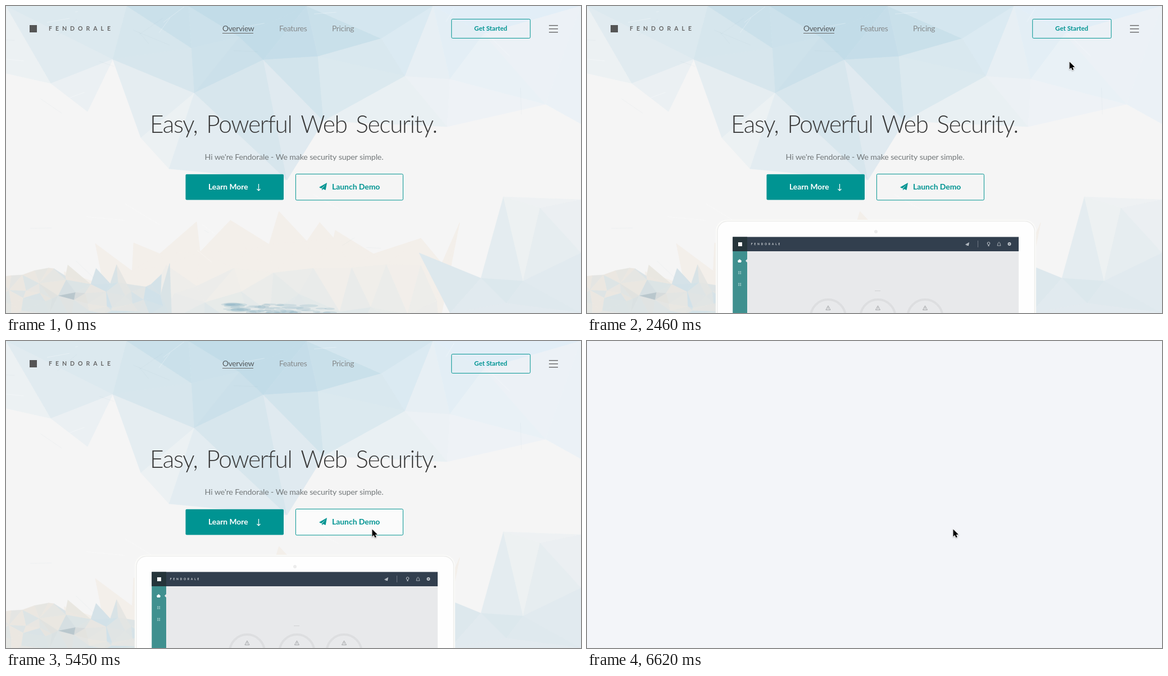
An HTML page with a canvas for the animation above (8 s loop, 1023 px wide and 547 px high).

```html
<!DOCTYPE html>
<html lang="en">
<head>
<meta charset="utf-8">
<title>Web Security</title>
<style>
html, body { margin: 0; width: 100%; height: 100%; overflow: hidden; background: #f5f5f5; }
canvas { display: block; width: 1023px; height: 547px; }
</style>
</head>
<body>
<canvas id="stage" width="1023" height="547"></canvas>
<script>
const W = 1023, H = 547, LOOP = 8000;
const TEAL = '#009492';
const PAPER = [245, 245, 245], BLUE = [190, 218, 231], HAZE = [205, 230, 250];
const CREAM = [243, 239, 234], MIST = [222, 231, 233], ICE = [208, 225, 233];
const ctx = document.getElementById('stage').getContext('2d');

const clamp = u => Math.max(0, Math.min(1, u));
const mix = (a, b, u) => a + (b - a) * u;
const blend = (a, b, u) => a.map((v, i) => mix(v, b[i], clamp(u)));
const bell = (x, mid, width) => Math.exp(-(((x - mid) / width) ** 2));
const rgb = c => `rgb(${c.map(Math.round)})`;

function rng(seed) {
  return () => (seed = (seed * 16807) % 2147483647) / 2147483647;
}

// ---- low-poly scenery ----

function pairs(list) {
  return list.flatMap((v, i) => i % 2 ? [] : [[v, list[i + 1]]]);
}

function jitterGrid(x0, y0, x1, y1, cell, rand) {
  const pts = [];
  for (let y = y0; y <= y1; y += cell * 0.8)
    for (let x = x0; x <= x1; x += cell)
      pts.push([x + (rand() - 0.5) * cell, y + (rand() - 0.5) * cell * 0.7]);
  return pts;
}

function circle([ax, ay], [bx, by], [cx, cy]) {
  const ux = bx - ax, uy = by - ay, vx = cx - ax, vy = cy - ay;
  const d = 2 * (ux * vy - uy * vx);
  if (Math.abs(d) < 1e-6) return null;
  const u = ux * ux + uy * uy, v = vx * vx + vy * vy;
  const x = (vy * u - uy * v) / d, y = (ux * v - vx * u) / d;
  return [ax + x, ay + y, x * x + y * y];
}

// Delaunay triangles: those whose circumcircle holds no other point.
function triangles(pts) {
  const out = [], n = pts.length;
  for (let i = 0; i < n; i++)
    for (let j = i + 1; j < n; j++)
      for (let k = j + 1; k < n; k++) {
        const c = circle(pts[i], pts[j], pts[k]);
        if (c && !pts.some(([x, y]) => (x - c[0]) ** 2 + (y - c[1]) ** 2 < c[2] - 1e-3))
          out.push([pts[i], pts[j], pts[k]]);
      }
  return out;
}

function facets(g, pts, rand, shade) {
  for (const [a, b, c] of triangles(pts)) {
    const color = shade((a[0] + b[0] + c[0]) / 3, (a[1] + b[1] + c[1]) / 3, rand() - 0.5);
    if (!color) continue;
    trace(g, [...a, ...b, ...c]);
    g.fillStyle = g.strokeStyle = rgb(color);
    g.lineWidth = 0.6;
    g.fill();
    g.stroke();
  }
}

function skyShade(x, y, r) {
  const edge = 130 + 150 * bell(x, 430, 190) + 60 * x / W;
  if (y > edge) return null;
  const strength = (0.45 + 0.55 * bell(x, 450, 260)) * (1 - 0.8 * y / edge);
  return blend(PAPER, blend(BLUE, HAZE, (x - 600) / 250), strength + r * 0.16);
}

function landShade(x, y, r) {
  const ridge = 400 + 55 * ((x - 500) / 300) ** 2;
  return y < ridge ? null : blend(CREAM, MIST, (y - ridge - 60) / 110 + r * 0.3);
}

function shoreShade(x, y, r) {
  if (y < 340 + Math.max(0, 885 - x) * 1.4) return null;
  return blend(PAPER, ICE, 0.2 + (y - 340) / 450 + r * 0.25);
}

function rockShade(x, y, r) {
  if (y < 476 + 25 * clamp((x - 200) / 90)) return null;
  const base = blend([235, 231, 225], ICE, x / 330 + r * 0.9);
  return blend(base, [150, 172, 184], 0.6 * bell(x, 105, 22) * bell(y, 518, 9));
}

function paintScenery() {
  const layer = document.createElement('canvas');
  layer.width = W;
  layer.height = H;
  const g = layer.getContext('2d'), rand = rng(4127);
  g.fillStyle = rgb(PAPER);
  g.fillRect(0, 0, W, H);

  const sky = pairs([0, 0, 0, 120, 80, 138, 145, 188, 190, 95, 215, 0, 240, 235, 290, 290,
    330, 75, 335, 155, 325, 0, 415, 55, 458, 96, 535, 0, 500, 310, 555, 90, 668, 58, 565, 205,
    710, 125, 785, 215, 790, 130, 760, 0, 850, 50, 960, 175, W, 0, W, 210]);
  const shore = pairs([735, 440, 845, 485, 885, 340, 950, 360, W, 345, W, 440,
    920, 490, 890, 530, 790, H, W, H]);
  facets(g, sky, rand, skyShade);
  facets(g, jitterGrid(40, 380, 800, 590, 62, rand), rand, landShade);
  facets(g, shore, rand, shoreShade);
  facets(g, jitterGrid(-15, 465, 300, 570, 27, rand), rand, rockShade);

  // faint creases between facets
  g.lineWidth = 1;
  for (let i = 0; i < 30; i++) {
    const x = rand() * W, y = i % 3 ? rand() * 170 : 350 + rand() * 110;
    g.strokeStyle = i % 2 ? 'rgba(255,255,255,.3)' : 'rgba(120,150,160,.06)';
    trace(g, [x, y, x + rand() * 140 - 70, y + rand() * 90 - 30], false);
    g.stroke();
  }
  // pool of water along the bottom
  g.fillStyle = 'rgba(130,175,192,.22)';
  for (let i = 0; i < 50; i++) {
    g.beginPath();
    g.ellipse(390 + rand() * 190, 531 + rand() * 18, 6 + rand() * 14, 1 + rand() * 3, 0, 0, 7);
    g.fill();
  }
  return layer;
}

// ---- drawing helpers ----

function trace(g, pts, closed = true) {
  g.beginPath();
  for (let i = 0; i < pts.length; i += 2) g.lineTo(pts[i], pts[i + 1]);
  if (closed) g.closePath();
}

function poly(color, pts) {
  trace(ctx, pts);
  ctx.fillStyle = color;
  ctx.fill();
}

function line(pts, color, width = 1, closed = false) {
  trace(ctx, pts, closed);
  ctx.strokeStyle = color;
  ctx.lineWidth = width;
  ctx.stroke();
}

function text(str, x, y, size, color, o = {}) {
  ctx.font = `${o.weight || 400} ${size}px Lato, "Open Sans", sans-serif`;
  ctx.letterSpacing = (o.letter || 0) + 'px';
  ctx.wordSpacing = (o.word || 0) + 'px';
  ctx.textAlign = o.align || 'left';
  ctx.fillStyle = color;
  ctx.fillText(str, x, y);
}

function rect(x, y, w, h, color) {
  ctx.fillStyle = color;
  ctx.fillRect(x, y, w, h);
}

function box(x, y, w, h, r, fill, stroke, width = 1) {
  ctx.beginPath();
  ctx.roundRect(x, y, w, h, r);
  if (fill) { ctx.fillStyle = fill; ctx.fill(); }
  if (stroke) { ctx.strokeStyle = stroke; ctx.lineWidth = width; ctx.stroke(); }
}

function ring(x, y, r, color, width) {
  ctx.beginPath();
  ctx.arc(x, y, r, 0, Math.PI * 2);
  ctx.strokeStyle = color;
  ctx.lineWidth = width;
  ctx.stroke();
}

function at(x, y, scale, draw) {
  ctx.save();
  ctx.translate(x, y);
  ctx.scale(scale, scale);
  draw();
  ctx.restore();
}

function plane(x, y, scale, color) {
  at(x, y, scale, () => {
    poly(color, [14, 0, 0, 8, 4, 10, 12, 3, 5, 10.5, 5, 13.5, 7, 11, 11.6, 13]);
  });
}

// ---- page ----

function drawHeader() {
  rect(42, 34, 13, 13, '#555');
  text('FENDORALE', 76, 44, 10.5, '#666', { weight: 700, letter: 6 });
  const nav = { Overview: 385, Features: 486, Pricing: 580 };
  for (const [label, x] of Object.entries(nav))
    text(label, x, 45, 13.8, x === 385 ? '#555a5d' : '#85898b', { letter: -0.3 });
  rect(385, 48, 55, 1, '#666');
  box(792.7, 23.4, 140, 34, 2, null, TEAL);
  text('Get Started', 862.5, 44, 11.5, TEAL, { weight: 700, align: 'center' });
  for (let i = 0; i < 3; i++) rect(966, 34 + i * 6, 16, 1.4, '#666');
}

function drawHero(hover) {
  text('Easy, Powerful Web Security.', 256, 226, 42.5, '#383838',
    { weight: 300, letter: -1.4, word: 5.6 });
  text("Hi we're Fendorale - We make security super simple.", 512.5, 274, 14.2, '#73787a',
    { letter: -0.15, align: 'center' });
  box(319.5, 299.7, 174.5, 45.8, 2, TEAL);
  text('Learn More', 360, 327, 13.8, '#fff', { weight: 700 });
  line([449.5, 317, 449.5, 329], '#fff', 1.2);
  line([446.5, 326, 449.5, 329, 452.5, 326], '#fff', 1.2);
  box(515.4, 299.4, 191, 46.5, 2, hover ? 'rgba(255,255,255,.6)' : null, TEAL);
  plane(557, 315, 1, TEAL);
  text('Launch Demo', 580, 327, 13.9, TEAL, { weight: 700 });
}

function drawTopIcons() {
  const c = '#c3c9cf';
  plane(673, 421, 0.5, c);
  rect(695, 418, 1, 12, '#6d7783');
  ring(714.5, 423, 2.3, c, 1);
  rect(713.5, 426, 2, 2, c);
  line([730, 427, 731.5, 422, 733, 420.7, 734.5, 422, 736, 427], c, 0.8, true);
  ring(751.5, 424, 2, c, 2);
}

function drawSidebar() {
  rect(259.3, 437, 25.7, 110, '#3f908f');
  poly('#fff', [271.5, 451, 275, 454, 274, 457, 269, 457, 268, 454]);
  poly('#e8e9eb', [285, 451, 282, 454, 285, 457]);
  for (const y of [472.5, 493.5])
    for (let i = 0; i < 4; i++)
      rect(269 + (i % 2) * 3, y + (i >> 1) * 3, 2.2, 2.2, '#8fc0bf');
}

function drawTablet() {
  box(229, 381, 570, 200, 20, '#fbfbf9');
  box(232, 383.5, 564.5, 200, 18, '#fefefe', '#ededec', 1.5);
  ring(514, 402, 1.5, '#ececec', 3);
  rect(259.3, 411.5, 508.7, 136, '#e8e9eb');
  rect(259.3, 411.5, 508.7, 25.5, '#323f4e');
  rect(259.3, 411.5, 25.7, 25.5, '#25343a');
  rect(269, 421, 7, 7, '#fff');
  text('FENDORALE', 292, 426, 4.6, '#e3e6e9', { weight: 700, letter: 3 });
  drawTopIcons();
  drawSidebar();
  rect(512, 507, 10, 1, '#cfd0d2');
  for (const x of [429, 517.5, 601.5]) {
    ring(x, 554, 31, '#dddee0', 4);
    line([x, 534, x + 4, 541.5, x - 4, 541.5], '#a5a7aa', 1, true);
    rect(x - 0.4, 536.8, 0.9, 3.2, '#a5a7aa');
  }
}

// ---- pointer ----

function drawArrow(x, y) {
  at(x, y, 1, () => {
    ctx.shadowColor = 'rgba(0,0,0,.3)';
    ctx.shadowBlur = 2;
    ctx.shadowOffsetY = 1;
    const shape = [0.5, 0.5, 0.5, 13.5, 3.4, 10.8, 5.4, 15.3, 7.8, 14.3, 5.8, 9.9, 9.8, 9.7];
    line(shape, '#fff', 1.6, true);
    ctx.shadowColor = 'transparent';
    poly('#000', shape);
  });
}

function drawHand(x, y) {
  // Outline every part first, then fill, so that the parts join.
  const parts = (fill, stroke) => {
    box(2.5, 0.7, 2.4, 9, 1.2, fill, stroke, 2);
    for (let i = 0; i < 3; i++) box(4.9 + i * 2.2, 4.5 + i * 0.5, 2.2, 6, 1.1, fill, stroke, 2);
    box(0.8, 7.2, 3, 3.5, 1.4, fill, stroke, 2);
    box(2.8, 7.5, 8.4, 6, 2, fill, stroke, 2);
  };
  at(x - 4, y, 1, () => {
    parts(null, '#111');
    parts('#fff');
    for (let i = 0; i < 3; i++) line([5.5 + i * 2, 9, 5.5 + i * 2, 11.8], '#222', 0.8);
  });
}

function pointer(t) {
  if (t < 2460) return null;
  if (t < 3360) {
    const u = Math.min(7, Math.floor((t - 2460) / 111)) / 7;
    const e = u * u * (3 - 2 * u);
    return [mix(858, 700, e), mix(99, 351, e)];
  }
  if (t < 5450) {
    const u = Math.min(4, 1 + Math.floor((t - 3360) / 116)) / 4;
    return [mix(700, 652, u), mix(351, 336, u)];
  }
  return [651, 335];
}

const scenery = paintScenery();

function render(t) {
  const pos = pointer(t);
  const overButton = pos && t >= 3360 && pos[1] < 346;
  if (t < 5570) {
    ctx.drawImage(scenery, 0, 0);
    drawHeader();
    drawHero(overButton);
    if (t >= 150) drawTablet();
  } else {
    rect(0, 0, W, H, t < 6620 ? '#fefefe' : '#f3f5f9');
  }
  if (pos) (overButton && t < 5450 ? drawHand : drawArrow)(...pos);
}

const start = performance.now();
function tick() {
  render((performance.now() - start) % LOOP);
  requestAnimationFrame(tick);
}
tick();
</script>
</body>
</html>
```
